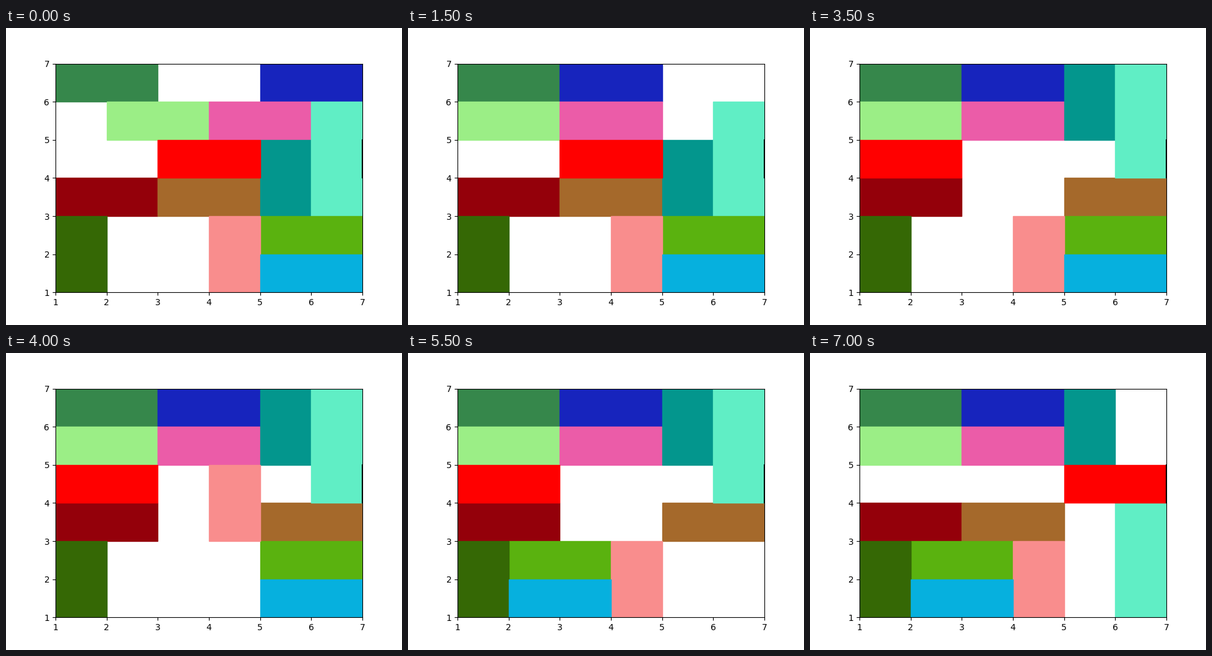
Write a matplotlib script that moves like this. It is 640 px wide and 480 px high and loops after 7.5 s.

```python
import matplotlib.pyplot as plt
from matplotlib.animation import FuncAnimation
from matplotlib.patches import Rectangle

STEP_MS = 500

# name: (x, y, width, height, colour), in drawing order
CARS = {
    "green": (1, 6, 2, 1, "#36874b"),
    "blue": (5, 6, 2, 1, "#1724bd"),
    "pale": (2, 5, 2, 1, "#9bee86"),
    "pink": (4, 5, 2, 1, "#eb5ca8"),
    "maroon": (1, 3, 2, 1, "#94000a"),
    "brown": (3, 3, 2, 1, "#a5692b"),
    "teal": (5, 3, 1, 2, "#03968d"),
    "mint": (6, 3, 1, 3, "#60eec5"),
    "lime": (5, 2, 2, 1, "#5ab20f"),
    "forest": (1, 1, 1, 2, "#356805"),
    "salmon": (4, 1, 1, 2, "#f98d8d"),
    "cyan": (5, 1, 2, 1, "#06b0de"),
    "red": (3, 4, 2, 1, "#ff0000"),
}

# One slide per step: car, dx, dy
MOVES = [
    ("blue", -2, 0),
    ("pale", -1, 0),
    ("pink", -1, 0),
    ("teal", 0, 2),
    ("mint", 0, 1),
    ("brown", 2, 0),
    ("red", -2, 0),
    ("salmon", 0, 2),
    ("lime", -3, 0),
    ("cyan", -3, 0),
    ("salmon", 0, -2),
    ("brown", -2, 0),
    ("mint", 0, -3),
    ("red", 4, 0),
]

fig, ax = plt.subplots(figsize=(6.4, 4.8), dpi=100)
ax.set(xlim=(1, 7), ylim=(1, 7), xticks=range(1, 8), yticks=range(1, 8))

patches = {
    name: ax.add_patch(Rectangle((x, y), w, h, color=color))
    for name, (x, y, w, h, color) in CARS.items()
}
ax.plot([7, 7], [4, 5], color="black")  # exit


def update(step):
    pos = {name: car[:2] for name, car in CARS.items()}
    for name, dx, dy in MOVES[:step]:
        x, y = pos[name]
        pos[name] = (x + dx, y + dy)
    for name, patch in patches.items():
        patch.set_xy(pos[name])
    return list(patches.values())


anim = FuncAnimation(fig, update, frames=len(MOVES) + 1, interval=STEP_MS,
                     repeat=True, repeat_delay=0, blit=False)
plt.show()
```
